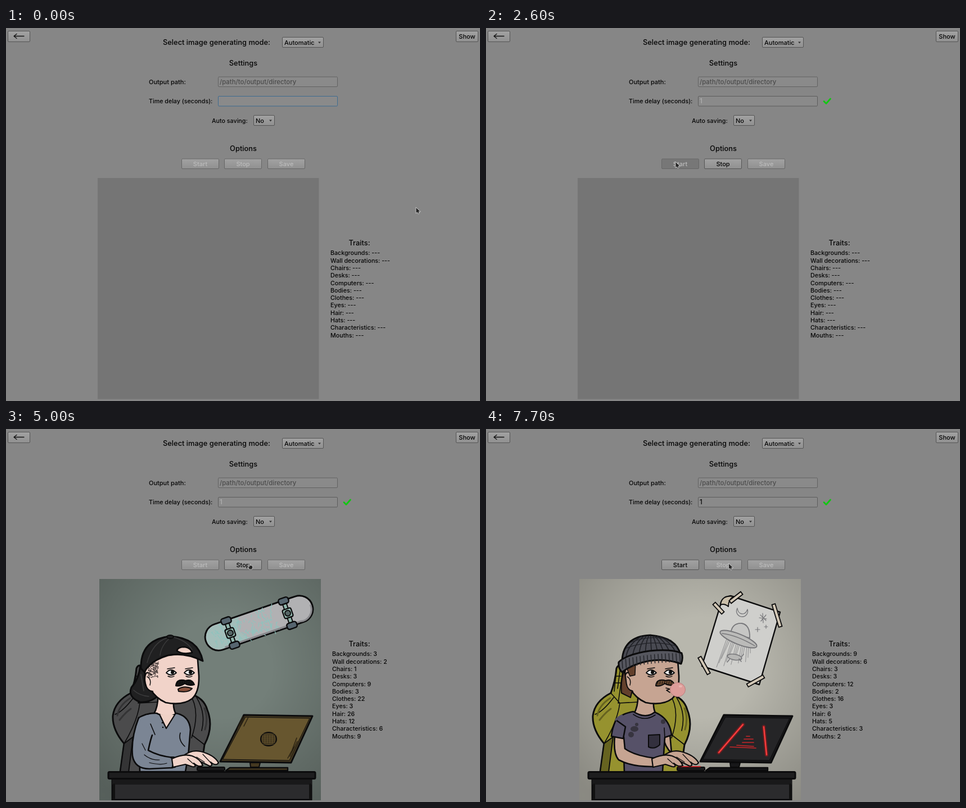
Write an HTML page that moves like this. It is 843 by 664 pixels and loops after 8000 ms.

```html
<!DOCTYPE html>
<html lang="en">
<head>
<meta charset="utf-8">
<title>Image generator</title>
<style>
  html, body { margin: 0; width: 100%; height: 100%; overflow: hidden; background: #868686; }
  svg { display: block; width: 843px; height: 664px; font-family: Inter, sans-serif; font-weight: 450; }
  path { stroke-linecap: round; stroke-linejoin: round; }
</style>
</head>
<body>
<svg viewBox="0 0 843 664">
  <defs>
    <linearGradient id="face" x2="0" y2="1"><stop stop-color="#a2a2a2"/><stop offset="1" stop-color="#909090"/></linearGradient>
    <radialGradient id="shade" cx=".55" cy=".4" r=".75"><stop offset=".3" stop-opacity="0"/><stop offset="1" stop-opacity=".25"/></radialGradient>
    <clipPath id="frame"><path d="M166 267h394v394h-394z"/></clipPath>
  </defs>
  <g id="art" clip-path="url(#frame)"></g>
  <g id="ui"></g>
  <g id="cursor"></g>
</svg>
<script>
const INK = '#0b0b0c';
const get = id => document.getElementById(id);
const shape = (d, fill, width = 2.6, ink = INK) =>
  `<path d="${d}" fill="${fill}" stroke="${ink}" stroke-width="${width}"/>`;
const line = (d, ink = INK, width = 1.6) => shape(d, 'none', width, ink);
const oval = (x, y, rx, ry, fill, width = 0, ink = INK, turn = 0) =>
  `<ellipse cx="${x}" cy="${y}" rx="${rx}" ry="${ry}" fill="${fill}" stroke="${ink}" stroke-width="${width}" transform="rotate(${turn} ${x} ${y})"/>`;
const box = (x, y, w, h, fill, ink = INK, width = 1, r = 0) =>
  `<rect x="${x}" y="${y}" width="${w}" height="${h}" rx="${r}" fill="${fill}" stroke="${ink}" stroke-width="${width}"/>`;
const repeat = (n, f) => Array.from({ length: n }, (_, i) => f(i)).join('');
const group = (attrs, body) => `<g ${attrs}>${body}</g>`;
const glow = (d, color, core = '#fff') =>
  group('opacity=".3"', line(d, color, 7)) + line(d, color, 3.5) + line(d, core, 1.6);
let seed = 7;
const rnd = (a, b) => a + (b - a) * ((seed = seed * 16807 % 2147483647) / 2147483647);

// Wall and decorations
const wall = (color, detail = '') =>
  box(166, 267, 394, 394, color, 'none') + detail + box(166, 267, 394, 394, 'url(#shade)', 'none');
const swirls = () => group('opacity=".13"', repeat(220, () => {
  const x = rnd(166, 560), y = rnd(267, 610);
  return line(`M${x} ${y}q${rnd(-8, 8)} ${rnd(-8, 8)} ${rnd(4, 14)} ${rnd(-5, 5)}`, '#b5b0a2', 1);
}));
const planks = () => group('opacity=".3"', repeat(28, i =>
  line(`M${166 + i * 14.5} 267v345`, i % 4 ? '#5a4733' : '#33261a', i % 4 ? 2 : 1.2)));

const tape = (x, y, len, turn) =>
  group(`transform="translate(${x} ${y}) rotate(${turn})"`, box(-len / 2, -3, len, 6, '#d3c8b6', INK, 1.8));
const poster = () => {
  const pencil = '#77777a';
  return shape('M417 313Q418 301 435 297L523 326 486 455 384 422Z', '#cfcfcc', 2.4)
    + shape('M417 313Q419 295 440 298Q431 304 431 316Q424 310 417 313', '#cabfaa', 2)
    + line('M447 319a10 10 0 1 0 18 2q-3 9-10 8t-8-10', pencil, 1.3)
    + line('M492 328l1 17M486 336l13 2M488 331l10 10M498 331l-9 11M483 353v8M479 357h8M498 349v6M495 352h6', pencil, 1.2)
    + group('opacity=".65"', repeat(15, i => line(`M${428 + i * 3} ${374 + i * .8}l${-18 + i * 1.3} ${50 - i * 1.6 - i % 3 * 7}`, pencil, 1.1)))
    + shape('M435 365Q437 345 455 346Q470 349 469 372Z', '#c6c6c4', 1.8, pencil)
    + oval(449, 374, 35, 9, '#bbbbb9', 2, pencil, 22)
    + line('M420 364Q446 367 478 386', pencil, 1.4)
    + oval(442, 406, 13, 5, '#b7b7b5', 1.6, pencil, 10) + line('M433 410l-4 5M450 409l4 5M455 405l3-4', pencil, 1.6)
    + tape(444.5, 300, 26, -38) + tape(413.5, 319, 23, 47) + tape(517.5, 332, 42, 73)
    + tape(388, 421, 34, 61) + tape(479.5, 448.5, 33, -29);
};
const skateboard = () => {
  const truck = x => line(`M${x} -20V20`, INK, 9) + line(`M${x} -20V20`, '#8fb5ab', 5)
    + box(x - 8, -8, 16, 16, '#8fb5ab', INK, 2.2, 3) + oval(x, 0, 5, 5, '#566', 2)
    + [-23, 23].map(y => box(x - 9, y - 5.5, 18, 11, '#56656f', INK, 2.4, 4)).join('');
  return group('transform="translate(450 345.500) rotate(-19)"',
    box(-100, -24, 200, 48, '#b1b1b3', INK, 3, 24)
    + shape('M-65 22H-76A22 22 0 0 1 -76-22H-30Q-52 0-20 22Z', '#a3beba', 0)
    + repeat(130, () => line(`M${rnd(-84, 32)} ${rnd(-19, 20)}l${rnd(-5, 5)} ${rnd(-9, 9)}`, '#8bc5bf', 1.1))
    + line('M-70 21H70A21 21 0 0 0 97 0', '#89898d', 3) + truck(-54) + truck(54));
};
const shelf = () => {
  const leaf = d => shape(d, '#5b685c', 2.2);
  const book = (x, y, w, color) => box(x, y, w, 10, color, INK, 2.2, 2) + line(`M${x + 10} ${y}v10M${x + w - 12} ${y}v10`, '#b7aa91', 2);
  return shape('M344 347h6v21h-5ZM526 347h7l-2 29h-5Z', '#3b2b20', 2) + box(334, 341, 209, 5.5, '#49392d', INK, 2.4)
    + book(448, 310, 70, '#6d5a52') + book(445, 320, 74, '#4b6078') + book(443, 330, 77, '#533336')
    + shape('M440 292l9 4-13 42-9-4Z', '#72635c', 2.2) + line('M438 299l8 3M430 325l8 3', '#b7aa91', 2)
    + shape('M358 312h39l-4 28h-31Z', '#a87033') + box(355, 307, 44, 6, '#b98143', INK, 2.2)
    + line('M366 317l2 20M374 317v20M382 317v20M389 317l-2 20', '#6c431d', 1.2)
    + leaf('M372 308Q350 286 316 290Q296 291 281 298Q320 305 344 300Q360 301 372 308')
    + leaf('M375 306Q357 280 311 281Q346 294 375 306')
    + leaf('M378 306Q390 285 360 273Q362 291 378 306') + leaf('M380 306Q384 282 407 280Q400 298 380 306')
    + leaf('M372 309Q340 300 319 315Q303 328 295 345Q330 342 347 324Q358 311 372 309')
    + leaf('M380 306Q404 284 432 305Q404 299 380 306')
    + leaf('M384 307Q402 302 414 326Q424 346 424 368Q408 357 402 332Q398 314 384 307')
    + line('M344 296Q320 294 294 297M347 312Q322 325 302 341M402 318Q413 336 421 360', '#323d34', 1);
};

// Furniture
const chair = (color, dark) =>
  shape('M203 611L210 560Q189 535 190 511Q193 485 222 470Q230 449 232 426Q236 417 244 424L258 446 326 471Q352 478 358 500Q370 530 353 562L346 611Z', color, 3)
  + shape('M210 560L226 548 218 611H203Z', dark, 2)
  + line('M222 470L238 488Q234 520 210 560M194 508Q208 503 227 478M232 430L228 467M239 425L234 462M244 424L235 488 272 486M326 471Q347 500 330 550M353 562L331 545M339 478Q356 506 348 537M229 452h12M231 440h9')
  + line('M198 510Q201 492 221 479M202 518Q212 505 222 498M353 497Q360 515 354 535', dark, 3);
const desk = (x, w, top, front, detail) =>
  box(x + 7, 622, w - 14, 38, front, INK, 3) + detail + box(x, 610.500, w, 12, top, INK, 3, 2);
const hatchDesk = () => desk(191, 347, '#2b2b30', '#62646f',
  group('opacity=".65"', repeat(26, i => line(`M${199 + i * 2.6} 624v${34 - i * 1.1}`, INK, 1)
    + line(`M${530 - i * 2.2} 624v${34 - i}`, INK, 1)) + repeat(7, i => line(`M199 ${628 + i * 4}h${56 - i * 7}`, INK, .8))));
const woodDesk = () => desk(191, 347, '#4c3d35', '#7b6a5e', repeat(23, i => {
  const x = 199 + i * 14.6;
  return line(`M${x} 623v37`, INK, 1.9) + line(`M${x + 4} 624q${rnd(-2, 5)} 17 0 35M${x + 9} 624q${rnd(-5, 3)} 15 0 35`, '#2c231e', 1.1)
    + (i % 4 == 1 ? oval(x + 7, 641, 2.5, 5, '#54463c', 1) : '');
}));
const blackDesk = () => desk(182, 368, '#1d1d1e', '#2b2b2d', box(189, 624, 355, 9, '#19191a', 'none') + line('M192 633v26M541 633v26', '#111', 4));
const scrawlDesk = () => desk(182, 368, '#48484a', '#62615d', box(190, 624, 353, 6, '#4a4946', 'none')
  + line('M204 642l18-3 5 10-18 5zl14 5 9-13M240 637q10-10 14 0t-6 11q-12-4-2-9 14-2 15 8M289 632l-3 15M296 631l-2 16M303 632l-2 15M284 637h25M283 643h28M313 648l28-15M317 637q15-6 13 3t-14 14M400 642h18v12h-18zl9 7 9-7M420 632q17-2 13 12t-18-2M447 640l4 14M453 637l3 15M459 637l1 15M445 650l22-15M488 633h19v11h-19zM510 635q15-9 20 3t-12 13q-12-4-8-16M488 648q9-8 17 4', '#393936', 1.1));

const laptop = decor => shape('M332 602h49v6h-49Z', '#202022', 2) + shape('M376 601h127v8H375Z', '#171719', 2.4)
  + shape('M420 517L543 518 506 601H381Z', '#151517', 3) + line('M426 521H535L501 597', '#2b2b2d', 1) + decor;
const monitor = (color, edge, decor) => box(340, 602, 49, 6, '#1b1b1c', INK, 2, 2)
  + shape('M398 603H501V608H391Z', edge, 2.4) + shape('M434 594h18l-2 8h-15Z', edge, 2)
  + shape('M423 509L545 511 507 594 381 592Z', edge, 3) + shape('M426 513L540 515 504 590 386 588Z', color, 1) + decor;
const eyeSign = () => glow('M454 565Q465 551 477 565Q465 578 454 565M466 548v6M456 550l3 5M476 550l-3 5M449 556l5 3M483 556l-5 3', '#bb668a', '#f3bfd4')
  + oval(466, 565, 4.5, 4.5, 'none', 2, '#f3bfd4');
const redLights = () => glow('M457 526L414 576M494 530L499 580', '#b91c20', '#ff4b49')
  + line('M463 547h6M459 552h16M456 558h20M446 563l30 2M434 566l46 2', '#c92629', 1.7);
const meshDisc = () => line('M424 512l-8 17M421 512l-9 21M431 513l-8 16M505 583l13-27M501 586l11-20M509 571l8-21', '#2a2213', 1.5)
  + oval(467, 552, 14, 12, '#3e331d', 2)
  + repeat(6, i => line(`M${456 + i * 4.4} 545v14M457 ${543 + i * 3.6}h20`, '#6b5a32', .8));

// Person
const head = skin => shape('M270 465Q272 492 263 507Q286 524 303 508Q297 500 298 484Z', skin)
  + shape('M251 406L247 434Q243 459 257 463Q266 479 284 487Q314 493 331 480Q344 468 343 439L340 398Z', skin)
  + shape('M259 438Q247 426 247 447Q249 467 261 467', skin, 2.2) + line('M251 441Q259 445 256 456', INK, 1.4);
const hands = skin => shape('M314 583Q329 570 346 574Q370 580 378 594Q374 601 364 593Q369 600 362 600L340 589Z', skin, 2.2)
  + shape('M295 587Q316 577 331 582Q345 587 350 599Q343 603 334 595Q340 603 331 601L319 597 297 602Z', skin, 2.2)
  + line('M350 579l13 14M339 584l14 9M323 587l10 9', INK, 1.3);
const sleeves = (color, cuff) =>
  shape('M236 514Q222 550 225 582Q229 605 255 605L296 603Q299 593 297 585Q270 582 253 572Q257 553 260 545', color)
  + shape('M293 584q8 9 2 19l6-1q4-10-2-18Z', cuff, 2) + line('M246 580q12 10 27 9M255 594q20 5 31 1M242 560l6 12', INK, 1.2);
const hoodie = (color, dark) =>
  shape('M236 514Q260 490 272 495Q290 505 307 495Q314 500 313 513Q327 520 328 546L320 610H237Q233 550 236 514Z', color)
  + shape('M236 514Q236 487 258 482Q270 481 268 493Q276 508 294 506Q302 502 301 489Q313 494 313 511Q301 521 280 519Q258 513 236 514Z', color)
  + line('M274 515v28M291 516v29', INK, 1.8) + line('M267 570H304L314 589M269 570L260 590', dark, 2)
  + line('M246 496q10 16 28 18M310 532l-8 23M252 534l7 16', INK, 1.4) + sleeves(color, dark);
const henley = color => shape('M236 514Q251 505 268 506Q288 517 303 506Q326 511 328 535L324 582 319 610H238Z', color)
  + shape('M273 508L285 533 300 509', '#efd1c6', 2.2) + oval(278, 523, 1.3, 1.3, INK) + oval(279, 531, 1.3, 1.3, INK)
  + line('M310 541q-4 13 8 24M257 525l8 19') + sleeves(color, color);
const tee = (color, skin, stains = '') =>
  shape('M314 545Q318 566 330 577L327 543Z', skin)
  + shape('M262 503Q240 507 231 518L244 550 246 610H314L318 549 330 545Q327 515 300 504Q284 517 262 503Z', color) + stains
  + shape('M229 547Q226 578 236 589Q260 602 299 601L301 586Q265 582 247 569L245 548Z', skin)
  + shape('M231 518Q224 534 223 547L244 551 248 530Z', color) + line('M231 518Q234 513 242 510', color, 3)
  + shape('M289 545l20 -1v18q-9 9-20 4Z', '#0006', 2) + line('M318 550l-1-18M262 508q20 14 39 1');
const stubble = () => repeat(130, () => oval(rnd(253, 271), rnd(412, 442), .95, .95, '#443a39'));

// Hats give a part behind the head and a part on top
const capBack = (color, gap, dark) => ({
  behind: shape('M239 421Q236 446 223 460Q216 477 238 486Q258 488 274 472Q250 454 248 429Z', color, 3)
    + line('M227 465Q238 475 254 476M240 437l5 29', dark, 1.6),
  front: shape('M240 426Q239 374 293 369Q342 372 350 413Q317 397 288 403Q257 412 246 433Z', color, 3)
    + line('M293 370Q262 376 251 416M294 370Q276 384 274 403M296 370Q322 377 331 393', dark, 1.3)
    + shape('M304 395Q305 388 318 388Q329 390 331 398Q315 402 304 395Z', gap, 2.6) + oval(292, 370, 6, 3, color, 2)
});
const capFront = () => ({
  behind: '',
  front: shape('M242 419Q238 369 281 361Q319 360 324 384Q276 388 242 419Z', '#565656', 3)
    + line('M281 362Q248 379 246 413M280 362Q259 378 262 403M282 362Q277 376 281 393M283 362Q297 370 301 387', '#2f2f31', 2.5)
    + shape('M286 391Q319 364 352 361Q373 364 369 383Q362 407 346 409Q328 389 286 391Z', '#716c7b', 3)
    + line('M351 371l4-5M357 380l6-9M357 390l7-10', INK, 1.2) + oval(281, 360, 5, 2.5, '#444', 2)
});
const beanie = () => ({
  behind: '',
  front: shape('M242 411Q245 369 292 367Q339 371 346 402Z', '#494a52', 3)
    + repeat(9, i => line(`M${249 + i * 11.5} 406Q${253 + i * 10} 382 ${277 + i * 4} 369`, '#202126', 1.7))
    + line('M250 390Q290 374 338 386M257 380Q292 365 329 376', '#202126', 1.2)
    + shape('M236 415Q250 401 291 395Q329 391 348 399Q351 408 347 418Q319 408 289 413Q259 419 242 433Q235 426 236 415Z', '#56575f', 3)
    + repeat(17, i => line(`M${242 + i * 6.4} ${411 - i * 1.5 + i * i * .05}l1 15`, '#25262b', 1.5))
});

const shades = () => line('M257 424L283 420', INK, 4)
  + ['M279 420Q295 415 313 419Q312 438 304 441Q289 444 283 437Z', 'M315 419Q332 415 347 418Q347 434 341 440Q326 444 319 437Z'].map(d => shape(d, '#2b2b2d', 3)).join('')
  + line('M287 435l9-11M292 437l12-15M299 437l8-10M323 435l9-11M329 437l12-14', '#8a8a8a', 1);
const eyes = () => [294, 326].map(x => shape(`M${x - 9} 434Q${x - 1} 424 ${x + 9} 434Q${x} 442 ${x - 9} 434`, '#eee', 1.8)
  + oval(x + 2, 433, 3, 3.5, INK) + line(`M${x - 7} 427l13-2M${x - 6} 440q6 3 11 0`, INK, 1.4)).join('');
const roundEyes = () => [300, 330].map(x => oval(x, 432, 6.5, 7.5, '#eee', 1.8) + oval(x + 1, 433, 1.8, 2, INK)).join('');
const mustache = color => shape('M302 457Q303 445 316 447L319 448Q331 444 335 455Q325 458 318 453Q310 459 302 457Z', color, 2)
  + repeat(7, i => line(`M${306 + i * 4} 449l-1 5`, INK, .9));
const bubble = () => line('M320 461l7 2-6 2 6 4') + oval(341, 464, 13.500, 12.500, '#dd9c99', 1, '#bb7e7d') + oval(346, 458, 3, 2, '#e9b5b0');
const cigarette = () => line('M318 465L339 482', INK, 7.5) + line('M318 465L326 471', '#ad713f', 4) + line('M326 471L338 481', '#deded9', 4)
  + line('M340 480Q351 481 350 473Q341 471 347 467', INK, 1.5);
const openMouth = () => shape('M306 463Q317 456 331 462Q325 470 307 467Z', '#89513c', 2);
const fangs = () => shape('M304 457H329V462l-3 4-4-4-3 4-4-4-3 4-4-3Z', '#ddd', 1.8) + line('M310 457v7M316 457v7M323 457v7');
const curls = () => repeat(17, i => {
  const a = Math.PI * (1.02 + i * .061);
  return oval(297 + 48 * Math.cos(a), 434 + 34 * Math.sin(a), 7.5, 7.5, '#171718', 1);
}) + shape('M249 410Q240 422 247 433Q260 434 264 422L267 407Z', '#171718', 1) + oval(344, 437, 5, 9, '#171718');
const tufts = () => shape('M247 425L256 442 263 432 266 458 273 431 283 413 340 413 348 458 352 432 346 406 275 402Z', '#1b1927', 1.6);
const brownHair = () => shape('M246 430Q239 447 241 470L257 478 260 466Q250 465 249 447Z', '#63402c', 2) + shape('M250 425L266 415 265 438 256 440Z', '#63402c', 1.4);

const person = ({ skin, hat, hair, clothes, face }) =>
  hat.behind + head(skin) + hair + hat.front + face + clothes;
const blueCap = gap => capBack('#4d738d', gap, '#2c485b');
const olive = () => chair('#96922f', '#666320'), gray = () => chair('#4b4b4c', '#343435');

const ASH = '#a09184', FAIR = '#ead7ca', ROSE = '#f1d3c9', TAN = '#c6a492';
const scenes = [
  () => wall('#5e5c56', swirls()) + poster() + olive()
    + person({ skin: ASH, hat: blueCap('#1b1927'), hair: tufts(), clothes: hoodie('#2c2c2d', '#202021'), face: shades() + cigarette() })
    + hatchDesk() + laptop(glow('M424 522L385 598M538 521L501 597', '#9bb43d', '#f4f3dd') + eyeSign()) + line('M340 601h35', '#c3a08e', 2) + hands(ASH),
  () => wall('#737f79') + poster() + gray()
    + person({ skin: FAIR, hat: blueCap(FAIR), hair: stubble(), clothes: tee('#762328', FAIR), face: shades() + bubble() })
    + woodDesk() + laptop(glow('M457 529L398 594M485 531L500 589', '#a98bb8') + oval(464, 562, 10, 10, '#39a93a')) + line('M344 601h34', '#43a640', 2) + hands(FAIR),
  () => wall('#737f79') + skateboard() + gray()
    + person({ skin: ROSE, hat: capBack('#202021', '#efd1c6', '#3c3c3d'), hair: stubble(), clothes: henley('#7b8594'), face: eyes() + openMouth() + mustache('#151515') })
    + blackDesk() + monitor('#67562f', '#443820', meshDisc()) + hands(ROSE),
  () => wall('#513d2a', planks()) + shelf() + chair('#252526', '#19191a')
    + person({ skin: ASH, hat: capFront(), hair: curls(), clothes: hoodie('#8994a2', '#717d8b'), face: roundEyes() + fangs() + mustache('#5a4c45') })
    + scrawlDesk() + monitor('#252527', '#171719', redLights()) + line('M343 601h38', '#bd2428', 2) + hands(ASH),
  () => wall('#b8b7ad') + poster() + olive()
    + person({ skin: TAN, hat: beanie(), hair: brownHair(), face: eyes() + mustache('#66472f') + bubble(),
      clothes: tee('#565168', TAN, oval(264, 534, 7, 5, '#37343f') + oval(258, 544, 5, 5, '#37343f') + oval(315, 521, 4, 4, '#37343f') + oval(268, 526, 3, 3, '#37343f')) })
    + blackDesk() + monitor('#252527', '#171719', redLights()) + line('M343 601h38', '#bd2428', 2) + hands(TAN)
];
get('art').innerHTML = scenes.map(draw => group('display="none"', draw())).join('');

// Window controls
const labels = ['Backgrounds', 'Wall decorations', 'Chairs', 'Desks', 'Computers', 'Bodies', 'Clothes', 'Eyes', 'Hair', 'Hats', 'Characteristics', 'Mouths'];
const traits = [
  [6, 6, 3, 6, 8, 6, 6, 3, 20, 11, 9, 11], [3, 6, 1, 1, 11, 1, 19, 6, 26, 11, 9, 2],
  [3, 2, 1, 3, 9, 3, 22, 3, 26, 12, 6, 9], [4, 5, 6, 5, 12, 6, 12, 1, 18, 16, 5, 1],
  [9, 6, 3, 3, 12, 2, 16, 3, 6, 5, 3, 2]
];
const text = (x, y, s, size = 10.7, fill = '#050505', anchor = 'start') =>
  `<text x="${x}" y="${y}" font-size="${size}" fill="${fill}" text-anchor="${anchor}">${s}</text>`;
const title = (x, y, s) => text(x, y, s, 12.85, '#050505', 'middle');
const button = (x, y, w, h, s, on = true, down = false) =>
  box(x + .5, y + .5, w - 1, h - 1, down ? '#777' : 'url(#face)', on ? '#555' : '#666', 1, 1.5)
  + text(x + w / 2, y + h / 2 + 4, s, 11, on ? '#050505' : '#bcbcbc', 'middle');
const select = (x, y, w, s) => button(x, y, w, 19, '') + text(x + 4, y + 13.5, s, 11) + shape(`M${x + w - 10} ${y + 8.5}h5l-2.500 3Z`, '#333', 0);
const input = (y, s, ink, border) => box(377.5, y + .5, 212, 17.5, '#8a8a8a', border, 1, 1.5) + text(380, y + 13, s, 11.4, ink);

const fixed = button(3, 5, 40, 20, '') + line('M32 14.500H14l5-4M14 14.500l5 4', '#111', 1.3) + button(800, 5, 40, 20, 'Show')
  + title(374.5, 30, 'Select image generating mode:') + select(491, 16, 74, 'Automatic')
  + title(422, 67, 'Settings') + text(254, 99.5, 'Output path:', 11) + input(86.5, '/path/to/output/directory', '#4b4b4b', '#626262')
  + text(254, 134, 'Time delay (seconds):') + text(366, 168.5, 'Auto saving:') + select(440, 155, 38, 'No')
  + title(422, 219, 'Options') + button(465, 232.5, 67, 18.5, 'Save', false) + title(628.5, 386.5, 'Traits:');

const drawUi = (t, scene) => {
  const running = t >= 2600 && t < 7700, typed = t >= 1200;
  const left = scene < 0 ? 577 : 580;
  return fixed
    + (scene < 0 ? box(163, 267, 393.5, 393.5, '#757575', 'none') : '')
    + input(121, typed ? '1' : '', running ? '#b0b0b0' : '#050505', t < 2600 ? '#3d6b90' : '#5c5c5c')
    + (t >= 300 && t < 800 ? line('M380 125v11', '#111', 1) : '')
    + (typed ? line('M601 130.500l4 4 7.500-8.500', '#12c812', 2.8) : '')
    + button(312, 232.5, 67, 18.5, 'Start', typed && !running, t === 2600)
    + button(388, 232.5, 67, 18.5, 'Stop', running, t === 7600)
    + labels.map((s, i) => text(left, 404.3 + i * 13.3, `${s}: ${scene < 0 ? '---' : traits[scene][i]}`)).join('');
};

// Pointer
const moves = [[0, 800, 638, 182], [1300, 2200, 337, 238], [2600, 3100, 431.5, 239]];
const pointer = t => {
  let x = 729, y = 319;
  for (const [from, to, nx, ny] of moves) {
    const p = Math.min(1, Math.max(0, (t - from) / (to - from))), e = p * p * (3 - 2 * p);
    x += (nx - x) * e;
    y += (ny - y) * e;
  }
  return [x, y];
};
const drawPointer = t => {
  if (t >= 1000 && t < 1400) return '';
  const [x, y] = pointer(t);
  const over = a => x >= a && x < a + 67 && y >= 233 && y < 251;
  const hand = t < 2600 ? over(312) : over(388) && t < 7700;
  return group(`transform="translate(${x} ${y})"`, shape(hand
    ? 'M0 1Q1-1 2 1V4Q5 3 7 5Q8 7 6 11H1L-1 7Q-1 5 1 6Z'
    : 'M0 .5V11L2.500 9 4 12 6 11 5 8H8Z', '#252525', .9, '#d0d0d0'));
};

const starts = [2700, 3800, 4900, 6100, 7200];
const art = [...get('art').children];
let shown = -1;
function tick() {
  const t = Math.floor(performance.now() % 8000 / 100) * 100;
  if (t !== shown) {
    shown = t;
    const scene = starts.filter(s => t >= s).length - 1;
    art.forEach((g, i) => g.setAttribute('display', i === scene ? 'inline' : 'none'));
    get('ui').innerHTML = drawUi(t, scene);
    get('cursor').innerHTML = drawPointer(t);
  }
  requestAnimationFrame(tick);
}
tick();
</script>
</body>
</html>
```
